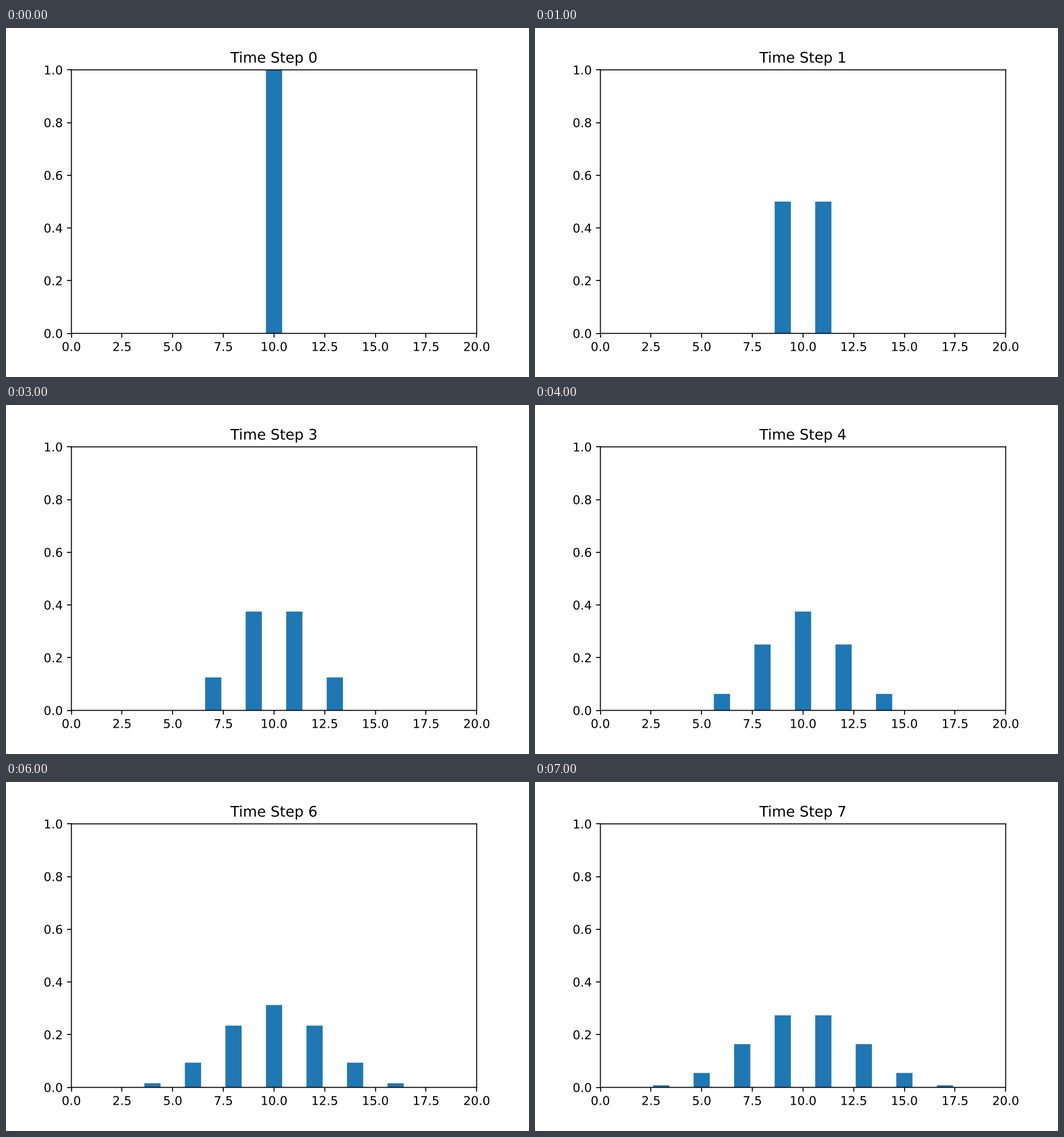
Recreate the animation shown at these times as a matplotlib script. Size 917x611 px, loop 8000 ms.

```python
import math

import matplotlib.pyplot as plt
from matplotlib.animation import FuncAnimation
from matplotlib.patheffects import Normal

WIDTH, HEIGHT, DPI = 917, 611, 152.8
STEPS = 8
START = 10
SITES = range(2 * START + 1)

# Draw lines, bars and glyph outlines at exact, unrounded positions.
plt.rcParams.update({
    "font.family": "DejaVu Sans",
    "text.hinting": "none",
    "path.snap": False,
    "path.effects": [Normal()],
})

# The tiny margin keeps the pixel size from rounding down.
fig = plt.figure(figsize=((WIDTH + 0.001) / DPI, (HEIGHT + 0.001) / DPI),
                 dpi=DPI, facecolor="white")
fig.subplots_adjust(left=0.125, right=0.9, bottom=0.125, top=0.88)
ax = fig.add_subplot()
ax.set_xlim(0, 20)
ax.set_ylim(0, 1)
bars = ax.bar(SITES, [0] * len(SITES), width=0.8, color="#1f77b4")
title = ax.set_title("Time Step 0")


def probability(site, step):
    """Chance that a fair random walk is at the site after the step."""
    shift = site - START
    if abs(shift) > step or (shift + step) % 2:
        return 0
    return math.comb(step, (shift + step) // 2) / 2 ** step


def draw(step):
    for site, bar in zip(SITES, bars):
        bar.set_height(probability(site, step))
    title.set_text(f"Time Step {step}")
    return [*bars, title]


anim = FuncAnimation(fig, draw, frames=STEPS, interval=1000,
                     repeat=True, repeat_delay=0, blit=False)
plt.show()
```
